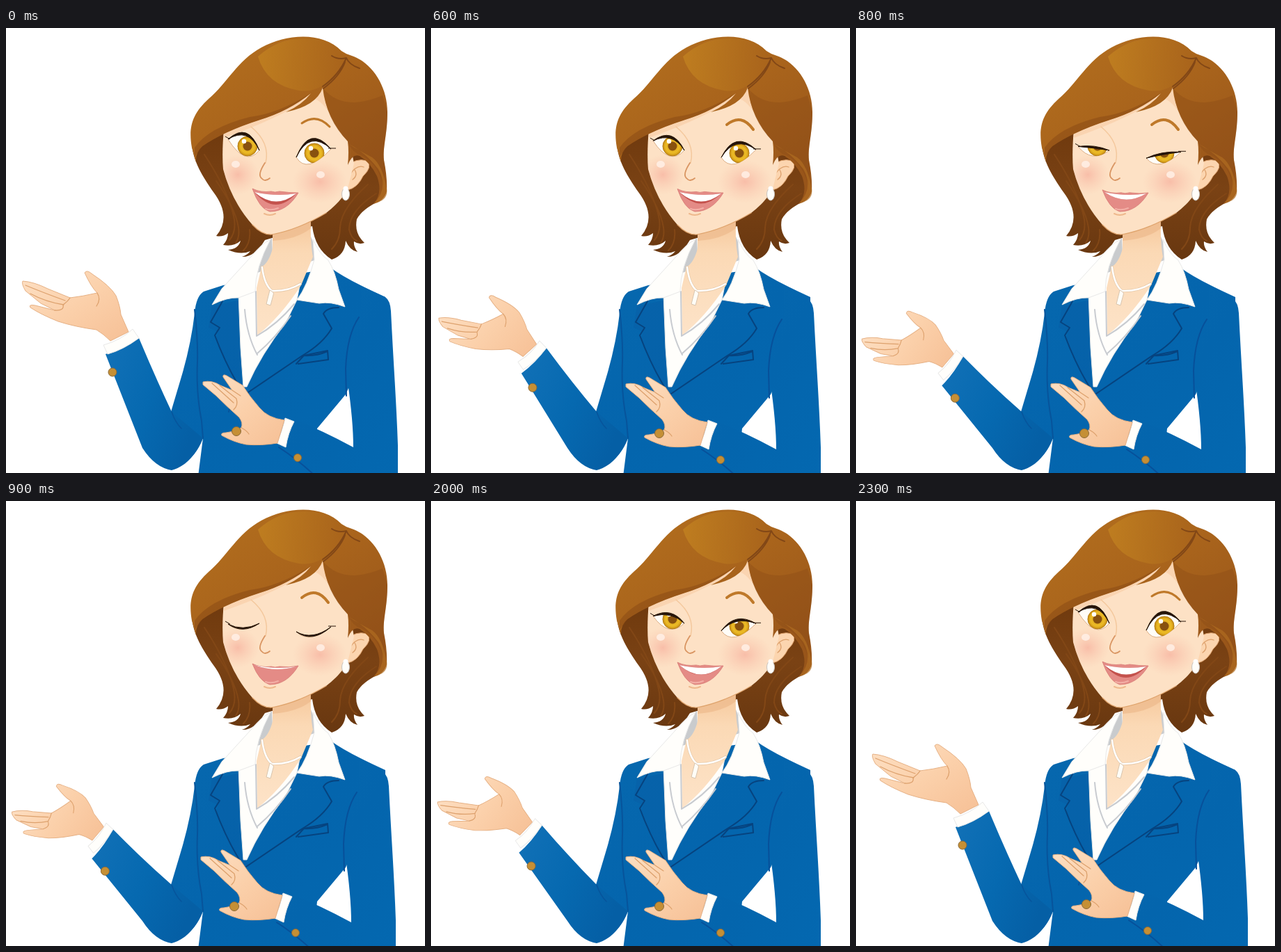
Write an HTML page that moves like this. It is 602 px wide and 640 px high and loops after 2.8 s.

```html
<!DOCTYPE html>
<html lang="en">
<head>
<meta charset="utf-8">
<title>Presenter</title>
<style>
html, body { margin: 0; width: 100%; height: 100%; overflow: hidden; background: #fff; }
svg { display: block; width: 100vw; height: 100vh; }
.line { fill: none; stroke-linecap: round; stroke-linejoin: round; }
.seam { stroke: #06437f; stroke-width: 2; }
.skinline { stroke: #dda16d; stroke-width: 1.3; }
.strand { stroke: #824716; stroke-width: 2; }
.hand { fill: url(#palm); stroke: #e6b185; stroke-width: 1; stroke-linejoin: round; }
.white { fill: #fffefb; stroke: #e8e8e8; stroke-width: 1; stroke-linejoin: round; }
.gold { fill: #c58f35; stroke: #8b6a3a; stroke-width: 1; }
.ink { fill: #261509; stroke: #261509; }
</style>
</head>
<body>
<svg viewBox="0 0 602 640" preserveAspectRatio="none">
  <defs>
    <linearGradient id="crown" x1="0" y1="0" x2=".75" y2="1">
      <stop offset="0" stop-color="#b4701e"/><stop offset=".5" stop-color="#a9641c"/><stop offset="1" stop-color="#98551a"/>
    </linearGradient>
    <linearGradient id="shine" x1="0" y1="0" x2="1" y2="0">
      <stop offset="0" stop-color="#c58521"/><stop offset="1" stop-color="#a8631b"/>
    </linearGradient>
    <linearGradient id="back" x1="0" y1="0" x2="0" y2="1">
      <stop offset="0" stop-color="#673309"/><stop offset=".6" stop-color="#7a4214"/><stop offset="1" stop-color="#683710"/>
    </linearGradient>
    <linearGradient id="suit" x1="0" y1="0" x2="1" y2="1">
      <stop offset="0" stop-color="#0768ae"/><stop offset=".5" stop-color="#0465ad"/><stop offset="1" stop-color="#0468b0"/>
    </linearGradient>
    <linearGradient id="sleeve" x1="0" y1="0" x2="1" y2=".5">
      <stop offset="0" stop-color="#1271b7"/><stop offset=".55" stop-color="#0669b0"/><stop offset="1" stop-color="#055fa5"/>
    </linearGradient>
    <linearGradient id="palm" x1="0" y1="0" x2="1" y2="1">
      <stop offset="0" stop-color="#fde0c4"/><stop offset=".5" stop-color="#fbd0aa"/><stop offset="1" stop-color="#f6c096"/>
    </linearGradient>
    <linearGradient id="neck" x1="0" y1="0" x2="0" y2="1">
      <stop offset="0" stop-color="#f5c699"/><stop offset=".3" stop-color="#fbd9b5"/><stop offset="1" stop-color="#fde3c8"/>
    </linearGradient>
    <radialGradient id="blush">
      <stop offset="0" stop-color="#f7b29f" stop-opacity=".75"/><stop offset="1" stop-color="#f9c3aa" stop-opacity="0"/>
    </radialGradient>
    <radialGradient id="iris">
      <stop offset="0" stop-color="#d39a14"/><stop offset=".7" stop-color="#ecbb27"/><stop offset="1" stop-color="#c98e12"/>
    </radialGradient>
    <clipPath id="faceClip"><use href="#face"/></clipPath>
    <clipPath id="clip0"><path id="hole0"/></clipPath>
    <clipPath id="clip1"><path id="hole1"/></clipPath>
  </defs>

  <!-- hair behind the head -->
  <path fill="url(#back)" d="M267 160C266 190 284 215 298 236Q325 272 302 299Q311 301 319 295Q319 304 312 312Q327 315 337 306Q334 318 319 319Q337 327 351 321Q346 327 339 329Q357 330 372 305L440 285Q444 318 468 333Q487 327 488 306Q494 320 505 322Q499 314 500 307Q507 312 515 309Q500 295 504 275Q510 263 530 252Q546 245 546 228L535 185L470 80L320 130Z"/>
  <path class="line strand" d="M285 182Q318 232 327 270Q332 292 321 305M302 220Q330 260 334 287Q336 301 330 309M350 290Q352 309 341 320M520 225Q481 260 480 287Q480 306 468 318M532 238Q493 263 493 290Q496 303 504 306"/>

  <!-- jacket -->
  <path fill="url(#suit)" d="M312 370L284 379Q273 386 271 410Q266 455 251 505L237 552L225 600L238 634Q270 625 283 590L276 645H440L447 576L488 527L500 500L545 400V387Q490 362 468 346Z"/>
  <path fill="#0b539a" opacity=".25" d="M296 400L291 431L305 437L302 450L341 526L350 526L338 510L334 392Z"/>
  <path class="line seam" d="M311 393L294 423L307 431L300 442Q318 490 341 525M478 402Q461 402 456 411L468 432Q455 454 426 471L345 526M417 483L428 471L462 464L463 477L420 483M428 471Q446 472 462 465"/>
  <path class="line" stroke="#07549b" stroke-width="2" d="M271 405Q276 450 275 480Q273 525 281 565L283 590M324 535L320 552"/>

  <!-- shirt, neck and collar -->
  <path class="white" d="M334 382L337 460L341 516L346 516Q366 470 402 424L418 391L430 330H365Z"/>
  <path fill="#c9cbcd" d="M382 302Q362 318 361 352L384 345ZM438 300Q446 316 443 334L432 338Z"/>
  <path fill="url(#neck)" d="M383 286L383 317Q378 337 367 344L360 374L361 442Q394 416 424 370L441 329Q437 310 438 272Z"/>
  <path fill="#edb98a" opacity=".65" d="M383 294Q415 292 438 276L438 288Q418 304 383 306Z"/>
  <path class="line" stroke="#c8cbd0" stroke-width="2" d="M343 405Q346 442 361 470M359 379L360 443Q390 426 414 397M361 468Q388 445 409 414"/>
  <path class="white" d="M380 304Q366 311 351 330L310 375L296 398Q318 387 334 388L358 379Q358 345 380 304ZM441 304Q450 325 463 334Q473 350 478 376L487 401Q466 393 450 396L418 391Q433 371 443 333Z"/>
  <path class="line" stroke="#e6c9a8" stroke-width="4" d="M368 344Q371 369 382 378Q405 379 423 368"/>
  <path class="line" stroke="#fff" stroke-width="2.5" d="M368 344Q371 369 382 378Q405 379 423 368"/>
  <path d="M379 377Q386 380 384 384L380 399L374 397L377 385Z" fill="#fffdf7" stroke="#d9c5ae"/>

  <!-- head -->
  <path d="M490 200Q501 186 519 191Q527 200 513 213Q505 230 491 233L480 220Z" fill="#fcd5af" stroke="#dca06b"/>
  <path class="line skinline" d="M494 211Q504 196 514 200M501 204Q506 212 498 218"/>
  <path id="face" fill="#fde1c5" d="M313 145Q310 180 312 203Q324 249 354 283Q368 298 382 297Q420 290 460 266Q482 249 491 231L500 195L490 140L455 82Z"/>
  <g clip-path="url(#faceClip)">
    <ellipse cx="333" cy="211" rx="31" ry="29" fill="url(#blush)"/>
    <ellipse cx="451" cy="221" rx="39" ry="31" fill="url(#blush)"/>
    <path fill="#f4c091" opacity=".4" d="M314 147L455 83L466 124Q448 96 433 102Q390 131 313 158Z"/>
  </g>
  <path class="line" stroke="#dfa46d" stroke-width="1.2" d="M354 283Q368 298 382 297Q420 290 460 266"/>
  <ellipse cx="330" cy="196" rx="6" ry="5" fill="#fff0e6" opacity=".85"/>
  <ellipse cx="452" cy="211" rx="6" ry="5" fill="#fff0e6" opacity=".85"/>
  <path class="line" stroke="#f4c89d" stroke-width="1.5" d="M352 142Q380 165 373 194"/>
  <path class="line" stroke="#d99562" stroke-width="1.8" d="M372 194Q361 211 367 216Q372 222 379 216"/>
  <path class="line" stroke="#eeb88c" stroke-width="2" d="M371 267Q379 271 387 267"/>
  <g id="eyes"></g>
  <path id="brow" class="line" stroke="#bf792a"/>
  <path id="lips" fill="#e48b86" stroke="#d77b75" stroke-width=".8"/>
  <path id="mouth" fill="#c4524d"/>
  <path id="teeth" fill="#fff"/>
  <path class="line" stroke="#f6b8ae" stroke-width="2" opacity=".8" d="M373 260Q381 263 391 259"/>

  <!-- hair in front -->
  <path fill="url(#crown)" d="M267 172C262 143 267 124 291 102C319 78 332 47 367 28C404 8 455 5 482 33Q489 38 497 40C526 50 548 84 548 121C548 153 541 170 543 190Q548 214 547 235Q543 249 528 253Q542 238 533 213Q523 193 508 184Q498 180 491 197Q493 178 491 163Q460 130 455 86Q446 112 402 121Q426 110 438 94Q407 119 365 132Q312 149 282 170Q272 179 273 193Z"/>
  <path fill="url(#shine)" d="M362 41Q392 14 430 15Q470 15 487 41Q485 58 470 72Q445 94 421 90Q374 82 362 41Z" opacity=".7"/>
  <path fill="#884914" opacity=".35" d="M456 87Q484 121 541 97L548 121C548 153 541 170 543 190Q546 210 542 226Q532 190 505 181Q494 174 491 163Q460 132 456 87Z"/>
  <path fill="#b06d22" opacity=".7" d="M491 166Q516 178 535 203Q550 230 529 252Q550 248 547 231Q541 197 526 186Q508 177 491 166Z"/>
  <path fill="#8a4b15" opacity=".55" d="M437 94Q392 123 350 128Q291 143 271 172L271 185L282 170Q312 149 365 132Q407 119 437 94Z"/>
  <path class="line strand" d="M455 84Q478 68 489 43Q493 53 508 58M489 43Q477 46 468 40M487 49Q480 69 456 87"/>
  <ellipse cx="488" cy="239" rx="5.5" ry="9" fill="#fffdf9" stroke="#c7c2bd"/>
  <circle cx="488" cy="231" r="3.5" fill="#fff"/>

  <!-- near arm -->
  <g id="near">
    <path fill="url(#suit)" d="M510 371L545 387Q552 392 553 407C556 470 561 540 563 600V648H448L391 602L412 562Q455 579 499 603Q499 560 488 490Q490 441 510 410Z"/>
    <path class="line" stroke="#07509a" stroke-width="2" d="M488 490Q490 441 507 416M392 603Q421 622 445 645M488 490L489 529"/>
    <path class="white" d="M401 561L414 566Q405 583 402 603L389 597Q397 580 401 561Z"/>
    <path class="hand" d="M283 509Q296 506 308 514L325 521L312 502Q311 497 317 500L340 514Q350 530 364 546Q376 561 400 564L390 597Q365 601 345 599Q328 596 310 586Q308 582 316 582Q330 580 338 575Q341 568 335 560Q318 545 302 529L283 513Z"/>
    <path class="line skinline" d="M296 511L327 539M307 514L331 533M325 521L337 529M331 533Q334 543 327 549M338 575Q345 578 349 584"/>
    <circle class="gold" cx="331" cy="580" r="6.5"/>
    <circle class="gold" cx="419" cy="618" r="5.5"/>
  </g>

  <!-- far arm -->
  <path id="forearm" fill="url(#sleeve)"/>
  <path class="line" stroke="#07549b" stroke-width="1.5" d="M238 552Q243 567 252 576"/>
  <g id="far">
    <path class="hand" d="M24 364Q40 365 60 375L92 388Q110 386 131 381Q122 372 113 352Q116 347 124 354Q150 371 158 385Q164 400 165 412L176 437L150 450Q140 440 130 434Q100 430 75 422Q50 412 35 402Q32 397 42 399L70 406L50 396L28 378Q22 368 24 364Z"/>
    <path class="line skinline" d="M28 370Q52 380 85 392M35 382Q57 394 83 398M70 406Q84 407 82 398Q89 393 92 388M131 381Q137 390 130 400"/>
    <path class="white" d="M140 456Q165 449 182 433L191 446Q168 463 146 469Z"/>
  </g>
  <circle id="stud" class="gold" r="6"/>
</svg>

<script>
const $ = id => document.getElementById(id);
const set = (id, attrs) => { for (const k in attrs) $(id).setAttribute(k, attrs[k]); };
const clamp = (v, max) => Math.max(0, Math.min(max, v));
const LOOP = 2800, STEP = 100, LAST = 5;

// the pose steps down from 500 ms and back up from 1900 ms
function poseAt(t) {
  const down = Math.floor((t - 400) / STEP), up = Math.floor((2300 - t - 1) / STEP) + 1;
  return clamp(Math.min(down, up), LAST);
}

$('eyes').innerHTML = [[347, 170], [443, 180]].map(([x, y], i) => `
  <path id="white${i}" fill="#fffdf8" stroke="#dcae86"/>
  <g clip-path="url(#clip${i})">
    <circle cx="${x}" cy="${y}" r="14" fill="url(#iris)" stroke="#b27b17"/>
    <circle cx="${x}" cy="${y}" r="6.5" fill="#88510f"/>
    <circle cx="${x - 5}" cy="${y - 7}" r="3.2" fill="#fff"/>
  </g>
  <path id="lash${i}" class="ink"/>`).join('');

// an eye between two corners; the lid's control point falls as it shuts
function drawEye(i, [x0, y0], [cx, cy], [x1, y1], floor, shut, flick) {
  const low = 2 * floor - (y0 + y1) / 2, t = 4 - 2 * shut;
  const d = `M${x0} ${y0}Q${cx} ${cy} ${x1} ${y1}Q${cx - 4} ${low} ${x0} ${y0}Z`;
  set('hole' + i, { d });
  set('white' + i, { d });
  set('lash' + i, { d: `M${x0} ${y0}Q${cx} ${cy - t} ${x1} ${y1}Q${cx} ${cy + t} ${x0} ${y0}Z${flick}` });
}

function drawFace(pose) {
  const shut = (pose / LAST) ** 2.2;
  const y0 = 160 + 17 * shut, y1 = 174 + 7 * shut;
  drawEye(0, [319, y0], [348 - 8 * shut, 138 + 52 * shut], [364, 176], 184, shut, `M322 ${y0}L315 ${y0 - 4}`);
  drawEye(1, [417, 186 + 2 * shut], [436 + 4 * shut, 142 + 61 * shut], [467, y1], 195.5, shut, `M463 ${y1 - 1}L474 ${y1 - 1}`);

  const open = 271 - 24 * shut, lip = 231 + 3 * shut;
  const gap = y => `M357 236Q388 243 417 238Q387 ${y} 357 236Z`;
  set('lips', { d: `M354 ${lip}Q366 ${lip + 6} 381 ${lip + 4}Q386 ${lip + 6} 393 ${lip + 4}Q407 ${lip + 6} 420 237Q404 264 379 264Q364 260 354 ${lip}Z` });
  set('mouth', { d: gap(open) });
  set('teeth', { d: gap(Math.min(open, 262)) });

  const lift = Math.min(pose, 1);
  set('brow', { d: `M425 ${137 + 2 * lift}Q446 122 ${465 - 2 * lift} ${142 + 4 * lift}`, 'stroke-width': 3 + lift });
}

// the hand and cuff turn and foreshorten about the wrist as the arm drops
function drawArms(pose) {
  const q = Math.min(pose / 4, 1), u = q ** .55;
  const hand = new DOMMatrix()
    .translate(150 - 26 * u, 450 + 19 * (u + q))
    .scale(1 - .21 * u, 1 - .05 * u)
    .rotate(-18 * u)
    .translate(-150, -450);
  const top = hand.transformPoint({ x: 191, y: 446 });
  const low = hand.transformPoint({ x: 143, y: 469 });
  low.y += 7 * u;
  set('far', { transform: `matrix(${[hand.a, hand.b, hand.c, hand.d, hand.e, hand.f]})` });
  set('forearm', { d: `M${top.x} ${top.y}Q${(top.x + 238) / 2} ${(top.y + 552) / 2 + 3} 238 552L283 590Q266 629 238 636Q214 632 196 604L${low.x} ${low.y}Q${(top.x + low.x) / 2 + 2} ${(top.y + low.y) / 2 + 4} ${top.x} ${top.y}Z` });
  set('stud', { cx: low.x + 10 + 9 * u, cy: low.y + 26 - 8 * u });
  const slip = 3 * Math.min(pose, 1);
  set('near', { transform: `translate(${-slip} ${slip})` });
}

let shown = -1;
function tick() {
  const pose = poseAt(performance.now() % LOOP);
  if (pose !== shown) {
    shown = pose;
    drawFace(pose);
    drawArms(pose);
  }
  requestAnimationFrame(tick);
}
tick();
</script>
</body>
</html>
```
